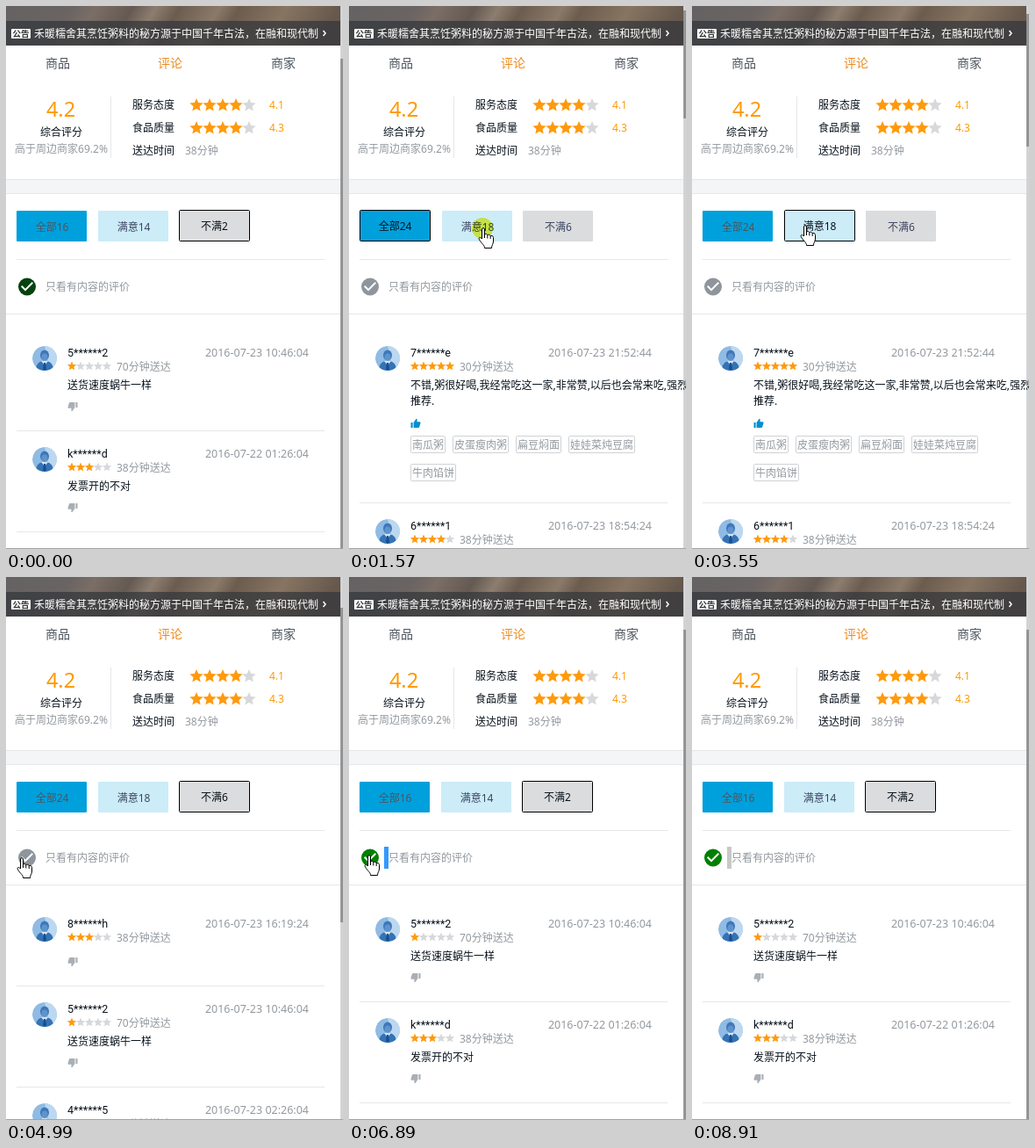
Animation of 384x618 px, one loop 8.93 s. Source, as an HTML page:

```html
<!DOCTYPE html>
<html lang="zh-CN">
<head>
<meta charset="utf-8">
<title>商家评论</title>
<style>
html, body { margin: 0; width: 100%; height: 100%; overflow: hidden; background: #fff; }
svg { display: block; width: 384px; height: 618px; }
text { font: 12px "Noto Sans", "Noto Sans CJK SC", sans-serif; fill: #07111b; white-space: pre; }
.tab { font-size: 14px; fill: #4d555d; }
.grey { fill: #93999f; }
.gold { fill: #f90; }
.big { font-size: 23.5px; }
.user { font: 12.5px Roboto, sans-serif; }
.date { font-size: 12.5px; fill: #93999f; }
.mid { text-anchor: middle; }
.end { text-anchor: end; }
#glow { mix-blend-mode: multiply; }
</style>
</head>
<body>
<svg viewBox="0 0 384 618">
  <defs>
    <linearGradient id="photo" gradientTransform="rotate(4)">
      <stop offset="0" stop-color="#656263"/>
      <stop offset=".2" stop-color="#6a6463"/>
      <stop offset=".27" stop-color="#7a6e66"/>
      <stop offset=".38" stop-color="#655a53"/>
      <stop offset=".45" stop-color="#8c7d6f"/>
      <stop offset=".52" stop-color="#6b5c50"/>
      <stop offset=".64" stop-color="#8b7a69"/>
      <stop offset=".7" stop-color="#6c5c4e"/>
      <stop offset=".84" stop-color="#877562"/>
      <stop offset="1" stop-color="#66584c"/>
    </linearGradient>
    <clipPath id="disc"><circle r="14"/></clipPath>
    <g id="face" clip-path="url(#disc)">
      <circle r="14" fill="#8fbbe4"/>
      <path d="M0-14H14V14H6Z" fill="#bcd8f0"/>
      <path d="M-10 14C-10 5-5 3 0 3S10 5 10 14Z" fill="#3573b5"/>
      <path d="M-4 3L0 8L4 3Z" fill="#d5e5f4"/>
      <path d="M-1 5H1L2 12L0 14L-2 12Z" fill="#184f8e"/>
      <ellipse cy="-3.5" rx="5" ry="6" fill="#3f77b8"/>
      <ellipse cy="-1.5" rx="3.5" ry="4" fill="#5f93cd"/>
    </g>
    <g id="thumb">
      <path d="M.5 5H2.6V11H.5ZM3.6 5L6.6 .8C7.8 .8 8 2 7.4 4.2H10.6C11.5 4.2 11.6 5 11.4 6L10.1 10.2C9.9 10.8 9.5 11 9 11H3.6Z"/>
    </g>
  </defs>
  <g id="page"></g>
  <g id="ui"></g>
  <rect y="617" width="384" height="1" fill="#a0a2a4"/>
  <circle id="glow" r="12" fill="#f4f44a"/>
  <g id="cursor" fill="#fff" stroke="#000" stroke-linejoin="round">
    <path id="arrow" d="M.5.5V16.5L4.3 13L6.7 18.5L9 17.5L6.6 12.2H11.5Z"/>
    <g id="hand">
      <path d="M-.5 1C-.5-.8 2.5-.8 2.5 1V7C3 6 5.5 6.3 5.8 7.8C6.5 6.8 9 7.2 9.2 8.8C10 8 12.5 8.5 12.5 10.5V15C12.5 18 10.5 19 10.5 22.5H2.5C2.5 19-.5 18-3.5 13C-4.8 10.5-2.5 9.5-.5 12Z"/>
      <path d="M2.5 7V11M5.8 8V11.5M9.2 9V12" fill="none"/>
    </g>
  </g>
</svg>
<script>
const LOOP = 8930;
const $ = id => document.getElementById(id);

const text = (x, y, s, cls = '') => `<text x="${x}" y="${y}" class="${cls}">${s}</text>`;
const rect = (x, y, w, h, fill, more = '') =>
  `<rect x="${x}" y="${y}" width="${w}" height="${h}" fill="${fill}" ${more}/>`;
const rule = (x, y, w) => rect(x, y, w, 1, '#e6e7e8');

function star(cx, cy, r, fill) {
  const pts = Array.from({length: 10}, (_, i) => {
    const a = i * Math.PI / 5, q = i % 2 ? r * .46 : r;
    return (cx + q * Math.sin(a)).toFixed(2) + ',' + (cy - q * Math.cos(a)).toFixed(2);
  });
  return `<polygon points="${pts.join(' ')}" fill="${fill}"/>`;
}

const stars = (x, y, gap, r, n) =>
  [0, 1, 2, 3, 4].map(i => star(x + i * gap, y, r, i < n ? '#ff9a0c' : '#d6d8db')).join('');

// Comments: user, date, stars, minutes, lines, tags
const slow = ['5******2', '2016-07-23 10:46:04', 1, 70, ['送货速度蜗牛一样']];
const bill = ['k******d', '2016-07-22 01:26:04', 3, 38, ['发票开的不对']];
const mute = ['8******h', '2016-07-23 16:19:24', 3, 38, []];
const last = ['4******5', '2016-07-23 02:26:04', 2, 38, []];
const good = ['7******e', '2016-07-23 21:52:44', 5, 30,
  ['不错,粥很好喝,我经常吃这一家,非常赞,以后也会常来吃,强烈', '推荐.'],
  ['南瓜粥', '皮蛋瘦肉粥', '扁豆焖面', '娃娃菜炖豆腐', '牛肉馅饼']];
const next = ['6******1', '2016-07-23 18:54:24', 4, 38, []];

function tagBoxes(tags, y) {
  let x = 70;
  return tags.map(s => {
    const w = s.length * 12 + 4;
    if (x + w > 345) { x = 70; y += 32; }
    const box = rect(x + .5, y + .5, w - 1, 19, '#fff', 'stroke="#cfd2d5" rx="1"') +
      text(x + 2, y + 15, s, 'grey');
    x += w + 8;
    return box;
  }).join('');
}

function comment([user, date, score, mins, lines, tags], y) {
  const foot = y + 46 + lines.length * 18;
  const icon = score > 3
    ? `<use href="#thumb" x="70" y="${foot}" fill="#008fd0"/>`
    : `<use href="#thumb" transform="translate(82 ${foot + 11}) rotate(180)" fill="#a9afb5"/>`;
  const svg = `<use href="#face" x="44" y="${y + 14}"/>` +
    text(70, y + 12, user, 'user') + text(345, y + 12, date, 'date end') +
    stars(75, y + 23, 10, 5.4, score) + text(126, y + 28, mins + '分钟送达', 'grey') +
    lines.map((s, i) => text(70, y + 49 + i * 18, s)).join('') + icon +
    (tags ? tagBoxes(tags, y + 102) : '');
  const end = tags ? y + 178 : foot + 32;
  return [svg + rule(12, end, 351), end + 19];
}

function comments(list) {
  let y = 387, out = '';
  for (const c of list) {
    const [svg, end] = comment(c, y);
    out += svg;
    y = end;
  }
  return out;
}

$('page').innerHTML =
  rect(0, 0, 384, 618, '#fff') + rect(0, 0, 381, 45, 'url(#photo)') +
  rect(0, 17, 381, 28, '#35373b', 'fill-opacity=".75"') +
  rect(6, 26, 22, 11, '#fff', 'rx="1"') +
  '<text x="17" y="35" class="mid" style="font-size:9.5px;font-weight:700;fill:#333">公告</text>' +
  '<text x="32" y="36" style="fill:#fff">禾暖糯舍其烹饪粥料的秘方源于中国千年古法，在融和现代制</text>' +
  '<path d="M361.5 28L364 31L361.5 34" fill="none" stroke="#fff" stroke-width="1.5"/>' +
  text(59, 70, '商品', 'tab mid') + text(316, 70, '商家', 'tab mid') +
  '<text x="187" y="70" class="tab mid" style="fill:#ee8a1d">评论</text>' +
  text(62.5, 126, '4.2', 'big gold mid') + text(63, 148, '综合评分', 'mid') +
  text(63, 167, '高于周边商家69.2%', 'grey mid') + rect(119, 103, 1, 70, '#e6e7e8') +
  [['服务态度', '4.1'], ['食品质量', '4.3']].map(([s, n], i) =>
    text(144, 117 + i * 26, s) + stars(217, 113 + i * 26, 15, 8, 4) +
    text(300, 117 + i * 26, n, 'gold')).join('') +
  text(144, 169, '送达时间') + text(204, 169, '38分钟', 'grey') +
  rect(0, 197, 381, 17, '#f3f5f7') + rule(0, 197, 381) + rule(0, 213, 381) +
  rule(12, 288, 351) + rule(0, 350, 381);

// When, chosen tab, only comments with text
const views = [[0, 2, 1], [1310, 0, 0], [1690, 1, 0], [2290, 2, 0], [3170, 1, 0],
  [3970, 2, 0], [5100, 2, 1], [5880, 2, 0], [6280, 2, 1]];
const tabs = [['全部', '#00a0dc', 12], ['满意', '#ccecf8', 105], ['不满', '#dbdcde', 197]];

function buttons(sel, only) {
  const counts = only ? [16, 14, 2] : [24, 18, 6];
  return tabs.map(([name, fill, x0], i) => {
    const x = x0 + (i > sel ? 1 : 0), on = i === sel;
    const box = on
      ? rect(x + .5, 232.5, 80, 35, fill, 'stroke="#000" rx="1"')
      : rect(x, 233, 80, 35, fill, 'rx="1"');
    const ink = on ? '#07111b' : i ? '#3c4360' : '#4d555d';
    return box + `<text x="${x + 40.5}" y="${on ? 255 : 256}" class="mid" style="fill:${ink}">${name}${counts[i]}</text>`;
  }).join('');
}

function drawView([t, sel, only], mark) {
  const [top, end] = sel === 0 ? [5, 128] : sel === 1 ? [9, 160] : only ? [60, 618] : [35, 393];
  const list = sel < 2 ? [good, next] : only ? [slow, bill] : [mute, slow, last];
  const fill = !only ? '#8f959c' : t ? '#008000' : '#05420f';
  $('ui').innerHTML =
    rect(381, 0, 3, 618, '#d2d3d5') + rect(381, top, 3, end - top, '#929496') +
    buttons(sel, only) +
    (mark ? rect(40, 307, 5, 25, mark) : '') +
    `<circle cx="24" cy="319.5" r="10" fill="${fill}"/>` +
    '<path d="M22 324.5L17 319.5L18.4 318.1L22 321.7L29.6 314.1L31 315.5Z" fill="#fff"/>' +
    text(45, 324, '只看有内容的评价', 'grey') + comments(list);
}

// Pointer moves: start, end, steps, x, y
const moves = [[290, 1160, 17, 59, 240], [1330, 1390, 3, 152, 253], [1690, 1870, 5, 243, 254],
  [2770, 2990, 6, 117, 250], [3550, 3820, 5, 226, 249], [4300, 4760, 10, 14, 321],
  [4990, 4990, 1, 17, 320], [6890, 6890, 1, 22, 317], [6940, 7090, 4, 263, 160],
  [7320, 7650, 7, 231, 300], [7700, 8210, 12, 338, 542], [8260, 8340, 3, 338, 620]];
const presses = [[1280, 1310], [1570, 1690], [2040, 2290], [3140, 3170],
  [5020, 5130], [5730, 5880], [6230, 6330]];

function pointer(t) {
  let x = 299, y = 557;
  for (const [a, b, n, tx, ty] of moves) {
    if (t < a) break;
    const k = t >= b ? 1 : (Math.floor((t - a) / (b - a) * (n - 1)) + 1) / n;
    const e = k * k * (3 - 2 * k);
    x += (tx - x) * e;
    y += (ty - y) * e;
  }
  return [Math.round(x), Math.round(y)];
}

const show = (el, on) => el.style.display = on ? '' : 'none';
let shown = '';

function render(t) {
  const view = views.filter(v => v[0] <= t).pop();
  const mark = t >= 8910 ? '#c8c8c8' : t >= 6230 ? '#3399ff' : '';
  const key = view + mark;
  if (key !== shown) drawView(view, mark);
  shown = key;

  const [x, y] = pointer(t);
  const onTab = y >= 233 && y < 268 && tabs.some(b => x >= b[2] && x < b[2] + 81);
  const onTick = Math.hypot(x - 24, y - 319.5) < 12;
  show($('cursor'), t >= 290 && t < 8340);
  show($('hand'), onTab || onTick);
  show($('arrow'), !onTab && !onTick);
  show($('glow'), presses.some(([a, b]) => t >= a && t < b));
  for (const id of ['cursor', 'glow']) $(id).setAttribute('transform', `translate(${x} ${y})`);
}

const start = performance.now();
function tick() {
  render((performance.now() - start) % LOOP);
  requestAnimationFrame(tick);
}
tick();
</script>
</body>
</html>
```
